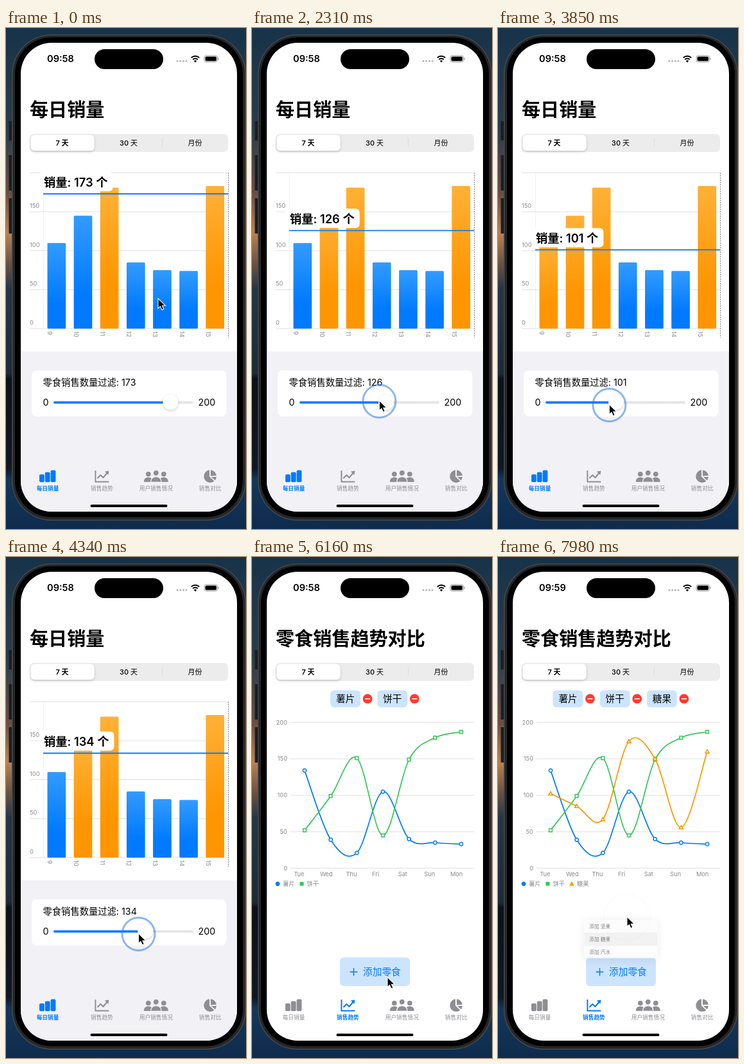
These frames come from a looping animation (374 by 780 pixels, 8 s). An HTML page:

```html
<!DOCTYPE html>
<html lang="zh-CN">
<head>
<meta charset="utf-8">
<style>
html, body { margin: 0; width: 100%; height: 100%; overflow: hidden; background: #12304c; }
svg { display: block; width: 100vw; height: 100vh; font-family: Inter, "Noto Sans CJK SC", "Noto Sans CJK", sans-serif; }
.mid { text-anchor: middle; }
.axis { font-size: 9.3px; fill: #8a8a8e; }
</style>
</head>
<body>
<svg viewBox="0 0 374 780">
  <defs>
    <linearGradient id="sky" x2="0" y2="1">
      <stop offset="0" stop-color="#173349"/><stop offset=".2" stop-color="#2a3c4b"/>
      <stop offset=".33" stop-color="#6a4d42"/><stop offset=".41" stop-color="#b98252"/>
      <stop offset=".47" stop-color="#6b5243"/><stop offset=".52" stop-color="#263645"/>
      <stop offset=".69" stop-color="#1d2a38"/><stop offset=".7" stop-color="#0d1118"/>
      <stop offset=".88" stop-color="#101824"/><stop offset=".9" stop-color="#14375a"/>
      <stop offset="1" stop-color="#0e2b4d"/>
    </linearGradient>
    <linearGradient id="blue" x2="0" y2="1">
      <stop stop-color="#339bff"/><stop offset=".7" stop-color="#007aff"/>
    </linearGradient>
    <linearGradient id="orange" x2="0" y2="1">
      <stop stop-color="#ffb137"/><stop offset=".7" stop-color="#ff9500"/>
    </linearGradient>
    <filter id="soft" x="-50%" y="-50%" width="200%" height="200%">
      <feDropShadow dx="0" dy="1.5" stdDeviation="2" flood-opacity=".2"/>
    </filter>
    <filter id="glow" x="-50%" y="-50%" width="200%" height="200%">
      <feDropShadow dx="0" dy="4" stdDeviation="14" flood-opacity=".18"/>
    </filter>
    <clipPath id="screen"><rect x="23" y="23" width="337" height="730" rx="48"/></clipPath>
  </defs>

  <rect width="374" height="780" fill="url(#sky)"/>
  <path d="M7 145v30M7 198v55M7 265v55" stroke="#1b1d20" stroke-width="5"/>
  <rect x="9" y="10" width="365" height="757" rx="62" fill="#48494b"/>
  <rect x="10.5" y="11.5" width="362" height="754" rx="60.5" fill="#252628"/>
  <rect x="14" y="14.5" width="355" height="747" rx="57" fill="#000"/>

  <g clip-path="url(#screen)">
    <rect x="23" y="23" width="337" height="730" fill="#fff"/>
    <g id="daily"></g>
    <g id="trend"></g>
    <text id="title" x="37" y="138" font-size="29.1" font-weight="700"></text>
    <rect x="37" y="165" width="309" height="28" rx="7" fill="#ececed"/>
    <rect x="38.5" y="166.5" width="99" height="24.5" rx="6" fill="#fff" filter="url(#soft)"/>
    <path d="M243.5 172v13" stroke="#dcdcde"/>
    <g class="mid" font-size="11" font-weight="500">
      <text x="87.500" y="183" font-weight="600">7 天</text>
      <text x="191" y="183">30 天</text>
      <text x="294.500" y="183">月份</text>
    </g>
    <g id="tabs"></g>
    <text id="clock" x="64" y="53.300" font-size="14.600" font-weight="600"></text>
    <rect x="138" y="33" width="107" height="31" rx="15.500"/>
    <g fill="#b9b9bb">
      <circle cx="267" cy="51.500" r="1.600"/><circle cx="271.700" cy="51.500" r="1.600"/>
      <circle cx="276.400" cy="51.500" r="1.600"/><circle cx="281" cy="51.500" r="1.600"/>
    </g>
    <path d="M288.800 46.200a9 9 0 0 1 12.400 0M291.200 49.100a5.600 5.600 0 0 1 7.600 0" fill="none" stroke="#000" stroke-width="2"/>
    <path d="M295 53.800l-2.200-2.500a3.200 3.200 0 0 1 4.400 0z"/>
    <rect x="309" y="43" width="20.500" height="10" rx="3" fill="none" stroke="#999"/>
    <rect x="310.500" y="44.500" width="17.500" height="7" rx="1.800"/>
    <path d="M331 46.500v3" stroke="#999" stroke-width="1.300"/>
    <g id="menu"></g>
    <rect x="131.500" y="742" width="120" height="4" rx="2"/>
  </g>

  <circle id="ring" r="25.500" fill="none" stroke="#2f7be8" stroke-width="3"/>
  <path id="cursor" d="M0 0V15.500L3.500 12.300 6 18 8.800 16.800 6.400 11.200H11.200Z" stroke="#fff" stroke-width="1.100"/>
</svg>

<script>
const LOOP = 8000, BLUE = '#007aff', GRAY = '#8e8e93';
const OPEN_TREND = 5450, OPEN_MENU = 6450, PICK = 7740, NEXT_MINUTE = 7000;
const $ = id => document.getElementById(id);
const clamp = v => Math.max(0, Math.min(1, v));
const smooth = k => k * k * (3 - 2 * k);
const set = (id, attrs) => { for (const k in attrs) $(id).setAttribute(k, attrs[k]); };
const rect = (x, y, w, h, r, fill, more = '') =>
  `<rect x="${x}" y="${y}" width="${w}" height="${h}" rx="${r}" fill="${fill}" ${more}/>`;
const text = (x, y, s, more = '') => `<text x="${x}" y="${y}" ${more}>${s}</text>`;
const line = (d, color, more = '') => `<path d="${d}" fill="none" stroke="${color}" ${more}/>`;

// Daily sales page
const sales = [110, 145, 181, 85, 75, 74, 183];
const levelY = v => 468 - v * 1.2125;
const thumbX = v => 82.2 + v * 1.006;

function buildDaily() {
  let s = rect(23, 503.5, 337, 250, 0, '#f1f1f6');
  for (let v = 0; v <= 200; v += 50) s += line(`M37 ${levelY(v)}H346`, '#dedee0', 'stroke-width=".9"');
  s += line('M58.5 225.500V468', '#d4d4d8', 'stroke-dasharray="1 2"');
  s += line('M346.500 225.500V482', '#77777c', 'stroke-dasharray="2 1.500"');
  sales.forEach((v, i) => {
    const x = 64.5 + i * 41.15, y = levelY(v);
    s += `<rect class="bar" x="${x}" y="${y}" width="28.7" height="${468 - y}" rx="1.5"/>`;
    s += text(0, 0, 9 + i, `class="axis" transform="translate(${x + .3} 472) rotate(90)"`);
  });
  s += '<rect id="plate" x="51" height="30" rx="6" fill="#fff"/>';
  s += '<path id="rule" d="M58 0H346" stroke="#0a7cf0" stroke-width="1.8"/>';
  s += '<text id="note" x="59" font-size="18.300" font-weight="600"></text>';
  for (let v = 0; v < 200; v += 50) s += text(37, levelY(v) - 6, v, 'class="axis"');
  s += rect(40, 533, 303.5, 72, 8, '#fff');
  s += '<text id="filter" x="57.500" y="557" font-size="14.300"></text>';
  s += text(57.5, 588, 0, 'font-size="14.300"') + text(299.5, 588, 200, 'font-size="14.300"');
  s += rect(74, 581.2, 218, 3.5, 1.7, '#e4e4e6') + `<rect id="fill" x="74" y="581.200" height="3.500" rx="1.700" fill="${BLUE}"/>`;
  s += '<circle id="thumb" cy="582.500" r="11.800" fill="#fff" filter="url(#soft)"/>';
  $('daily').innerHTML = s;
}

function drawDaily(v) {
  const n = Math.round(v), y = levelY(v), x = thumbX(v);
  document.querySelectorAll('.bar').forEach((b, i) =>
    b.setAttribute('fill', `url(#${sales[i] > n ? 'orange' : 'blue'})`));
  $('note').textContent = `销量: ${n} 个`;
  set('note', { y: y - 11.3 });
  set('plate', { y: y - 34, width: $('note').getComputedTextLength() + 16 });
  set('rule', { transform: `translate(0 ${y})` });
  $('filter').textContent = `零食销售数量过滤: ${n}`;
  set('fill', { width: x - 74 });
  set('thumb', { cx: x });
}

// Trend page
const snacks = [
  { name: '薯片', color: BLUE, data: [134, 39, 21, 105, 40, 35, 33], mark: '<circle r="2.700"' },
  { name: '饼干', color: '#34c759', data: [52, 99, 151, 45, 149, 179, 187], mark: '<rect x="-2.400" y="-2.400" width="4.800" height="4.800"' },
  { name: '糖果', color: '#ff9500', data: [102.5, 85, 67, 174, 150, 56, 160], mark: '<path d="M0-3L3 2.300H-3Z"' }
];

function spline(p) {
  let d = `M${p[0]}`;
  for (let i = 0; i < p.length - 1; i++) {
    const a = p[i - 1] || p[i], b = p[i], c = p[i + 1], e = p[i + 2] || c;
    const h = k => [b[k] + (c[k] - a[k]) / 6, c[k] - (e[k] - b[k]) / 6];
    const [x1, x2] = h(0), [y1, y2] = h(1);
    d += `C${x1} ${y1} ${x2} ${y2} ${c}`;
  }
  return d;
}

function buildTrend(count) {
  let s = '';
  for (let v = 0; v <= 200; v += 50) {
    const y = 484.5 - v * 1.135;
    s += line(`M60 ${y}H346`, '#dedee0', 'stroke-width=".9"') + text(55, y + 3.2, v, 'class="axis" text-anchor="end"');
  }
  ['Tue', 'Wed', 'Thu', 'Fri', 'Sat', 'Sun', 'Mon'].forEach((d, i) =>
    s += text(65.3 + i * 40.6, 497, d, 'class="axis"'));
  snacks.slice(0, count).forEach(({ name, color, data, mark }, i) => {
    const x = 191.3 - (73.2 * count - 8) / 2 + i * 73.2, pts = data.map((v, j) => [82 + j * 40.67, 484.5 - v * 1.135]);
    s += rect(x, 207.5, 47, 26.5, 6, '#cce4ff') + text(x + 23.5, 226, name, 'class="mid" font-size="14.600"');
    s += `<circle cx="${x + 58}" cy="220.700" r="7.400" fill="#ff3b30"/>` + line(`M${x + 54} 220.700h8`, '#fff', 'stroke-width="1.500"');
    s += line(spline(pts), color, 'stroke-width="1.700"');
    for (const p of pts) s += `<g transform="translate(${p})">${mark} fill="#fff" stroke="${color}" stroke-width="1.500"/></g>`;
    s += `<g transform="translate(${40 + i * 37.5} 508.800) scale(1.250)">${mark} fill="${color}"/></g>`;
    s += text(48 + i * 37.5, 512, name, 'class="axis"');
  });
  s += rect(137, 623.5, 109, 44.5, 6, '#cce4ff');
  s += line('M152.500 646h12M158.500 640v12', BLUE, 'stroke-width="1.500"');
  s += text(173, 651.3, '添加零食', `font-size="14.700" fill="${BLUE}"`);
  $('trend').innerHTML = s;
}

function buildTabs(active) {
  const person = (x, y, k) => `<g transform="translate(${x} ${y}) scale(${k})"><circle cy="-5.500" r="4.700"/><path d="M-8.500 8.500C-8.500-2 8.500-2 8.500 8.500Q8.500 9.500 7 9.500H-7Q-8.500 9.500-8.500 8.500Z"/></g>`;
  const icons = [
    '<rect x="-13" y="-3" width="7.800" height="12" rx="1.800"/><rect x="-4.200" y="-6.500" width="7.800" height="15.500" rx="1.800"/><rect x="4.600" y="-9.500" width="7.800" height="18.500" rx="1.800"/>',
    c => line('M-10-9V8.500H11M-7 3L-2-2 2 2 8-5', c, 'stroke-width="2" stroke-linejoin="round"') + '<path d="M4.500-7.500L11-8.500 10-2Z"/>',
    person(-12, 1, .82) + person(12, 1, .82) + `<g stroke="${active ? '#fff' : '#f1f1f6'}" stroke-width="1.200">${person(0, 0, .96)}</g>`,
    '<path d="M-1.200-9.700A9.800 9.800 0 1 0 6.300 7.500L-1.200.600Z"/><path d="M.800-9.700A9.800 9.800 0 0 1 9.700-1.200L.800-.400Z"/><path d="M1.800 1.200L9.700.800A9.800 9.800 0 0 1 7.600 6.200Z"/>'
  ];
  $('tabs').innerHTML = ['每日销量', '销售趋势', '用户销售情况', '销售对比'].map((label, i) => {
    const c = i === active ? BLUE : GRAY, icon = icons[i];
    return `<g transform="translate(${65 + i * 84.4} 698)" fill="${c}">${icon.call ? icon(c) : icon}` +
      text(0, 22.3, label, `class="mid" font-size="8.700" font-weight="${i === active ? 700 : 400}"`) + '</g>';
  }).join('');
}

function buildMenu() {
  let s = rect(84.5, 504, 214, 113, 11, '#fafafa', 'filter="url(#glow)"');
  s += '<rect id="hot" x="84.500" y="541.700" width="214" height="37.600" fill="#e6e6e8"/>';
  s += line('M84.500 541.700h214M84.500 579.300h214', '#d9d9dc', 'stroke-width=".8"');
  ['坚果', '糖果', '汽水'].forEach((n, i) => s += text(98.5, 528 + i * 37.6, '添加 ' + n, 'font-size="14.600"'));
  $('menu').innerHTML = s;
}

// Motion
const drag = [[980, 173], [1600, 160], [2310, 126], [3010, 55], [3350, 32], [3850, 101], [4300, 134]];
const path = [[0, 237, 421], [350, 247, 583], [980, 246, 583], [2310, 0, 580], [3010, 0, 586], [4300, 206.5, 586],
  [4450, 206.5, 586], [5040, 149, 700], [5560, 149, 700], [6100, 211, 654], [6850, 211, 654], [7400, 201, 560]];
const presses = [[840, 4350], [5300, 5420], [6330, 6430], [7600, 7700]];

function track(keys, t, col) {
  const i = keys.findIndex(k => k[0] > t);
  if (i < 0) return keys[keys.length - 1][col];
  const a = keys[i - 1], b = keys[i];
  return a[col] + (b[col] - a[col]) * smooth((t - a[0]) / (b[0] - a[0]));
}

function level(t) {
  const n = drag.length - 1;
  if (t <= drag[0][0]) return drag[0][1];
  if (t >= drag[n][0]) return drag[n][1];
  const i = drag.findIndex(k => k[0] > t) - 1;
  const slope = j => j > 0 && j < n ? (drag[j + 1][1] - drag[j - 1][1]) / (drag[j + 1][0] - drag[j - 1][0]) : 0;
  const [t0, a] = drag[i], [t1, b] = drag[i + 1], w = t1 - t0, k = (t - t0) / w;
  return a + (b - a) * smooth(k) + w * k * (1 - k) * (slope(i) * (1 - k) - slope(i + 1) * k);
}

function drawPointer(t, v) {
  const x = t > 980 && t < 4300 ? thumbX(v) - 10.5 : track(path, t, 1), y = track(path, t, 2);
  set('cursor', { transform: `translate(${x} ${y})` });
  const press = presses.find(([a, b]) => t >= a && t < b + 290);
  const gone = press ? clamp((t - press[1]) / 290) : 1;
  set('ring', { cx: x, cy: y + 1, r: 25.5 + 11 * gone, opacity: .55 * (1 - gone) });
}

function drawMenu(t) {
  const closing = clamp((t - PICK) / 400);
  const open = smooth(clamp((t - OPEN_MENU) / 300));
  const k = t < PICK ? .2 + .8 * open : 1 - .78 * closing;
  set('menu', {
    transform: `translate(191.500 634) scale(${k}) translate(-191.500 -634)`,
    opacity: t < PICK ? open : 1 - .85 * closing
  });
  set('hot', { opacity: t > 7600 ? 1 : 0 });
}

let page = '';
function frame(now) {
  const t = now % LOOP, v = level(t), trend = t >= OPEN_TREND, count = t >= PICK ? 3 : 2;
  if (page !== `${trend}${count}`) {
    page = `${trend}${count}`;
    buildTabs(+trend);
    buildTrend(count);
    $('title').textContent = trend ? '零食销售趋势对比' : '每日销量';
    set('daily', { display: trend ? 'none' : 'inline' });
    set('trend', { display: trend ? 'inline' : 'none' });
  }
  $('clock').textContent = t < NEXT_MINUTE ? '09:58' : '09:59';
  if (!trend) drawDaily(v);
  drawMenu(t);
  drawPointer(t, v);
  requestAnimationFrame(frame);
}
buildDaily();
buildMenu();
requestAnimationFrame(frame);
</script>
</body>
</html>
```
